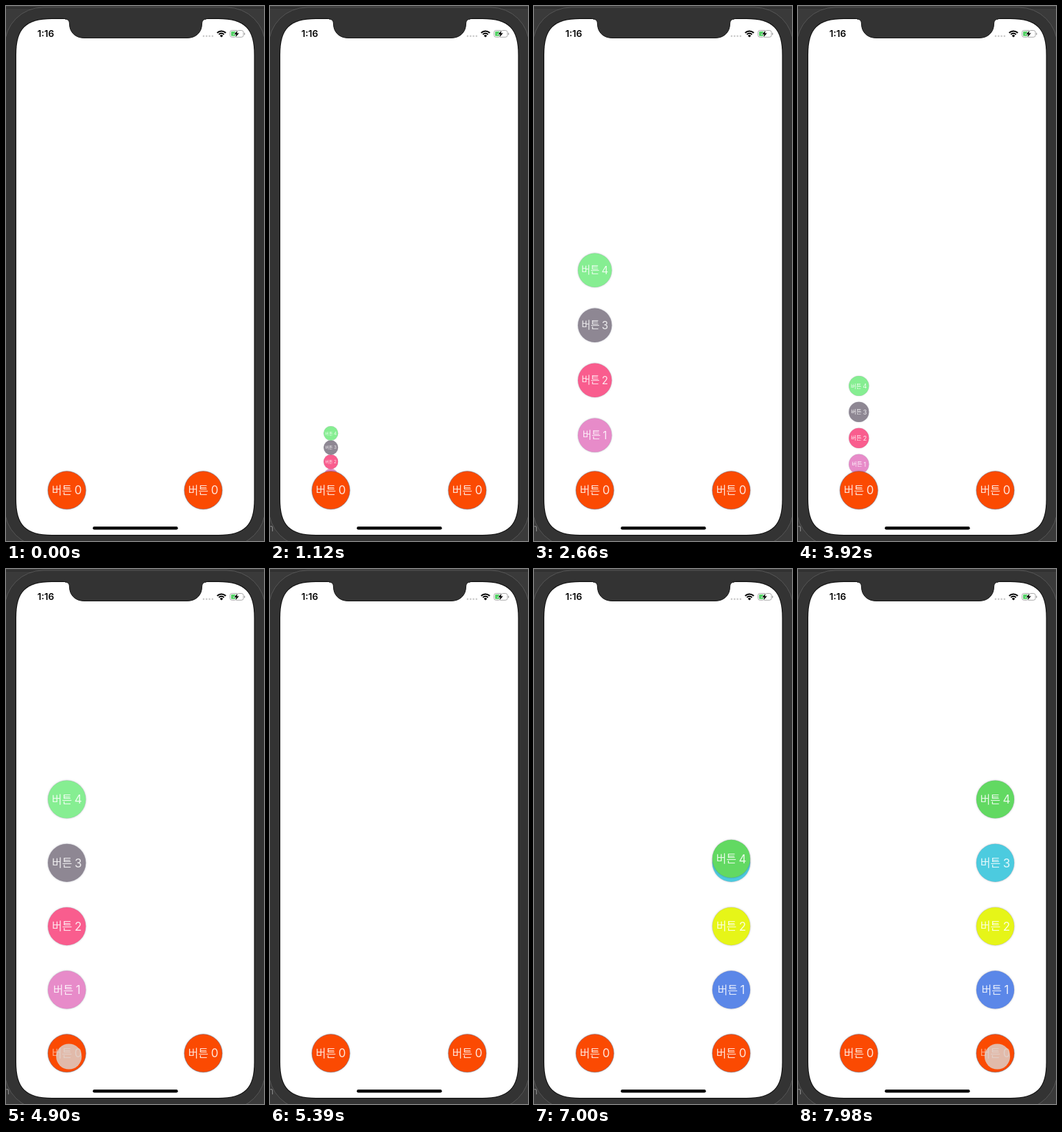
Recreate the animation shown at these times as an HTML page with a canvas. Size 376 px wide and 778 px high, loop 8000 ms.

```html
<!DOCTYPE html>
<html lang="ko">
<head>
<meta charset="utf-8">
<style>
html, body { margin: 0; width: 100%; height: 100%; overflow: hidden; background: #333; }
canvas { display: block; width: 376px; height: 778px; }
</style>
</head>
<body>
<canvas id="stage"></canvas>
<script>
const W = 376, H = 778, LOOP = 8000, TAU = Math.PI * 2;
const canvas = document.getElementById('stage');
const ctx = canvas.getContext('2d');
const dpr = window.devicePixelRatio || 1;
canvas.width = W * dpr;
canvas.height = H * dpr;

const BASE_Y = 704.2, GAP = 92.3, R = 27.6;
const LEFT = { x: 88.7, colors: ['#e78bc9', '#f95d8e', '#8e8793', '#86ee92'] };
const RIGHT = { x: 287.5, colors: ['#5b87e8', '#e6f518', '#4ccbdf', '#62d962'] };
const MAIN = '#fb4a02';

// menu moves: [start, from, to]
const FAN = [[957, 0, 1], [2534, 1, 0], [3697, 0, 1], [4955, 1, 0]];
const FAN_TIME = 500;
const SLIDE_START = 6143, SLIDE_STEP = 270;
// finger presses: [menu, down, up]
const PRESSES = [
  [LEFT, 70, 957], [LEFT, 2170, 2534], [LEFT, 3570, 3697],
  [LEFT, 4760, 4955], [RIGHT, 5880, 6143], [RIGHT, 7900, 8200]
];

const clamp = v => Math.max(0, Math.min(1, v));

// cubic-bezier(.42, 0, .58, 1)
function ease(p) {
  p = clamp(p);
  let lo = 0, hi = 1;
  for (let i = 0; i < 24; i++) {
    const u = (lo + hi) / 2, v = 1 - u;
    const x = 3 * v * v * u * .42 + 3 * v * u * u * .58 + u * u * u;
    if (x < p) lo = u; else hi = u;
  }
  return lo * lo * (3 - 2 * lo);
}

function disc(x, y, r, fill) {
  ctx.beginPath();
  ctx.arc(x, y, r, 0, TAU);
  ctx.fillStyle = fill;
  ctx.fill();
}

function box(x, y, w, h, r, fill, stroke) {
  ctx.beginPath();
  ctx.roundRect(x, y, w, h, r);
  if (fill) { ctx.fillStyle = fill; ctx.fill(); }
  if (stroke) { ctx.strokeStyle = stroke; ctx.stroke(); }
}

function label(n) {
  const word = '16px "Noto Sans CJK KR", "Noto Sans CJK", "Noto Sans KR", sans-serif';
  const digit = '17px Inter, Roboto, sans-serif';
  ctx.textAlign = 'left';
  ctx.textBaseline = 'alphabetic';
  ctx.font = digit;
  const dw = ctx.measureText(n).width;
  ctx.font = word;
  const ww = ctx.measureText('버튼').width;
  const x = -(ww + 3.6 + dw) / 2;
  ctx.fillText('버튼', x, 5.8);
  ctx.font = digit;
  ctx.fillText(n, x + ww + 3.6, 6.2);
}

function button(x, y, scale, color, n, edge = .1, textAlpha = .86) {
  ctx.save();
  ctx.translate(x, y);
  ctx.scale(scale, scale);
  ctx.save();
  ctx.shadowColor = 'rgba(50,50,70,.35)';
  ctx.shadowBlur = 2.5 * dpr * scale;
  disc(0, 0, R, color);
  ctx.restore();
  ctx.beginPath();
  ctx.arc(0, 0, R, 0, TAU);
  ctx.lineWidth = .8;
  ctx.strokeStyle = `rgba(80,80,110,${edge})`;
  ctx.stroke();
  ctx.fillStyle = `rgba(255,255,255,${textAlpha})`;
  label(String(n));
  ctx.restore();
}

function fanAmount(t) {
  let r = 0;
  for (const [start, from, to] of FAN)
    if (t >= start) r = from + (to - from) * ease((t - start) / FAN_TIME);
  return r;
}

function slideAmount(t) {
  let d = 0;
  for (let i = 0; i < 4; i++) d += ease((t - SLIDE_START) / SLIDE_STEP - i);
  return d;
}

function pressAmount(menu, t) {
  let a = 0;
  for (const [m, down, up] of PRESSES)
    if (m === menu) a = Math.max(a, Math.min(clamp((t - down) / 70), 1 - clamp((t - up) / 100)));
  return a;
}

function drawMenus(t) {
  const r = fanAmount(t), d = slideAmount(t);
  for (let i = 1; i <= 4; i++) {
    if (r > 0) button(LEFT.x, BASE_Y - GAP * i * r, .2 + .8 * r, LEFT.colors[i - 1], i);
    if (d > 0) button(RIGHT.x, BASE_Y - GAP * Math.min(i, d), 1, RIGHT.colors[i - 1], i);
  }
  for (const menu of [LEFT, RIGHT]) {
    const a = pressAmount(menu, t);
    button(menu.x, BASE_Y, 1, MAIN, 0, .45, .86 - .35 * a);
    if (a > 0) {
      ctx.globalAlpha = a;
      disc(menu.x + 3, BASE_Y + 4.8, 18.6, 'rgba(218,218,218,.78)');
      ctx.globalAlpha = 1;
    }
  }
}

// rectangle whose corners ease gradually into the sides
function screenPath(x, y, w, h) {
  const e = 52, c = 14, r = x + w, b = y + h;
  ctx.beginPath();
  ctx.moveTo(x + e, y);
  ctx.lineTo(r - e, y);
  ctx.bezierCurveTo(r - c, y, r, y + c, r, y + e);
  ctx.lineTo(r, b - e);
  ctx.bezierCurveTo(r, b - c, r - c, b, r - e, b);
  ctx.lineTo(x + e, b);
  ctx.bezierCurveTo(x + c, b, x, b - c, x, b - e);
  ctx.lineTo(x, y + e);
  ctx.bezierCurveTo(x, y + c, x + c, y, x + e, y);
  ctx.closePath();
}

function drawPhone() {
  ctx.fillStyle = '#3a3a3a';
  ctx.fillRect(0, 0, W, H);
  ctx.fillStyle = '#2b2b2b';
  ctx.fillRect(0, 2, W, 1.5);
  ctx.lineWidth = 1;
  box(-2, 2, 380, 784, 56, '#333', '#565656');
  screenPath(15, 19, 346.5, 750);
  ctx.lineWidth = 2.4;
  ctx.strokeStyle = '#111';
  ctx.stroke();
  ctx.fillStyle = '#fff';
  ctx.fill();

  // notch
  ctx.beginPath();
  ctx.moveTo(86, 17);
  ctx.lineTo(86, 19);
  ctx.quadraticCurveTo(92.5, 19, 92.5, 26);
  ctx.bezierCurveTo(92.5, 38, 101, 46.5, 114, 46.5);
  ctx.lineTo(264, 46.5);
  ctx.bezierCurveTo(277, 46.5, 285.5, 38, 285.5, 26);
  ctx.quadraticCurveTo(285.5, 19, 292, 19);
  ctx.lineTo(292, 17);
  ctx.closePath();
  ctx.fillStyle = '#333';
  ctx.fill();
  ctx.lineWidth = 1;
  ctx.strokeStyle = '#161616';
  ctx.stroke();
  ctx.fillStyle = '#333';
  ctx.fillRect(84, 15, 210, 3);
}

function drawStatus() {
  ctx.fillStyle = '#000';
  ctx.font = '600 13.5px Inter, Roboto, sans-serif';
  ctx.textAlign = 'center';
  ctx.textBaseline = 'alphabetic';
  ctx.fillText('1:16', 58, 45.3);

  for (let i = 0; i < 4; i++) disc(288 + i * 4.3, 43.8, 1.3, '#c8c8c8');

  // wifi
  ctx.strokeStyle = '#000';
  ctx.lineWidth = 2;
  for (const r of [5.2, 8.6]) {
    ctx.beginPath();
    ctx.arc(314, 45, r, -Math.PI * .76, -Math.PI * .24);
    ctx.stroke();
  }
  ctx.beginPath();
  ctx.moveTo(314, 45.6);
  ctx.arc(314, 45.6, 3.3, -Math.PI * .76, -Math.PI * .24);
  ctx.closePath();
  ctx.fillStyle = '#000';
  ctx.fill();

  // battery
  ctx.lineWidth = 1;
  box(326.5, 35.5, 19.5, 9.8, 2.8, '#fff', '#a9a9a9');
  box(328, 37, 7, 6.8, 1.3, '#55d267');
  box(347, 38.8, 1.3, 3.4, .6, '#a9a9a9');
  ctx.beginPath();
  ctx.moveTo(337.6, 35.6);
  ctx.lineTo(332.4, 41.2);
  ctx.lineTo(335.6, 41.2);
  ctx.lineTo(334.4, 45.4);
  ctx.lineTo(339.6, 39.6);
  ctx.lineTo(336.4, 39.6);
  ctx.closePath();
  ctx.lineWidth = 1.2;
  ctx.strokeStyle = '#fff';
  ctx.stroke();
  ctx.fillStyle = '#000';
  ctx.fill();

  box(126.5, 757, 124, 4.4, 2.2, '#000');
}

function draw(t) {
  ctx.setTransform(dpr, 0, 0, dpr, 0, 0);
  drawPhone();
  drawStatus();
  if (t >= 910) {
    ctx.fillStyle = '#8a8a8a';
    ctx.font = '13px Inter, sans-serif';
    ctx.textAlign = 'left';
    ctx.fillText('n', -2.5, 764);
  }
  drawMenus(t);
}

const begin = performance.now();
function tick() {
  draw((performance.now() - begin) % LOOP);
  requestAnimationFrame(tick);
}
tick();
</script>
</body>
</html>
```
